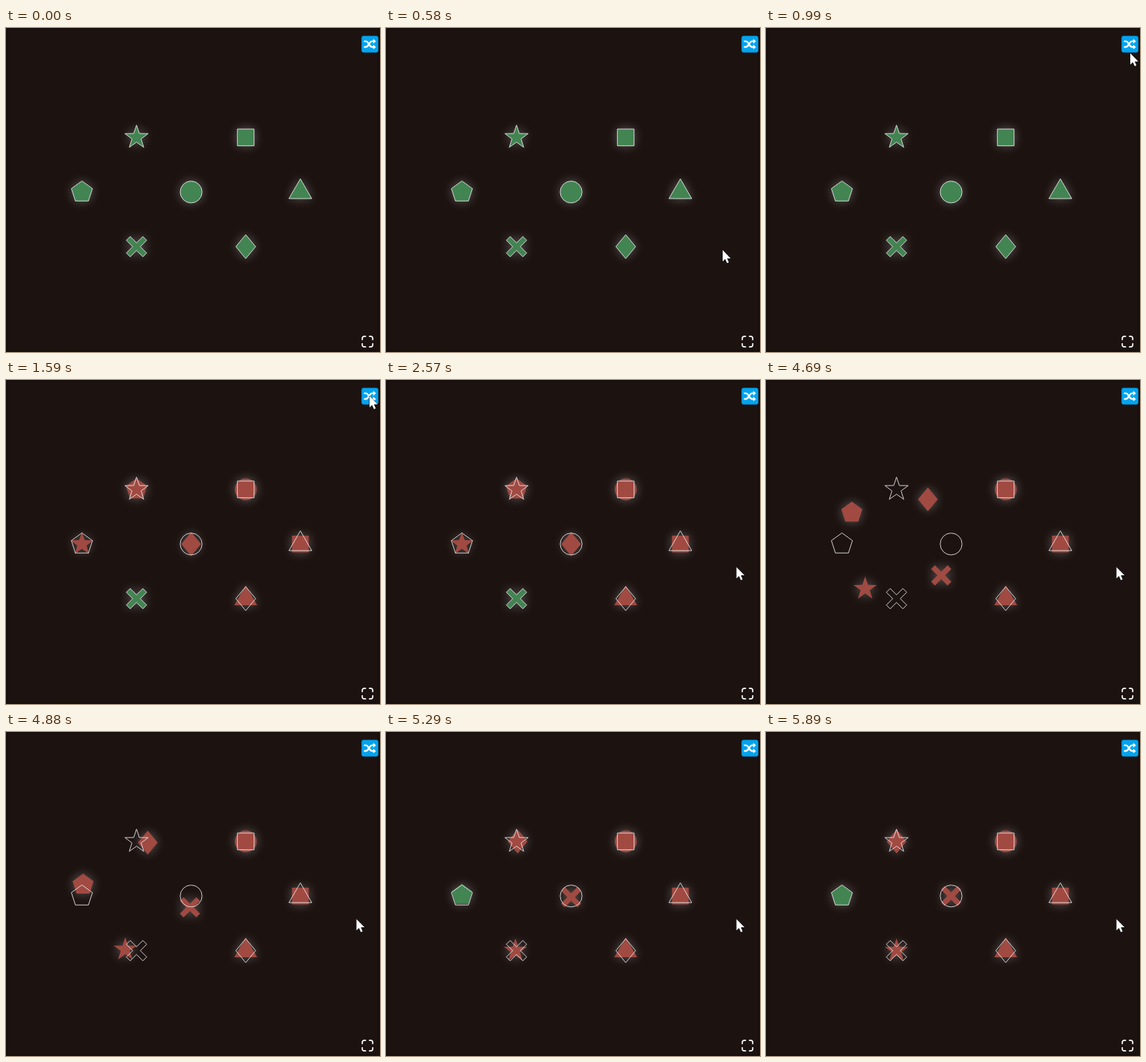
An HTML page with a canvas for the animation above (8 s loop, 500 by 433 pixels).

```html
<!DOCTYPE html>
<html lang="en">
<head>
<meta charset="utf-8">
<title>Shape rotation puzzle</title>
<style>
html, body { margin: 0; width: 100%; height: 100%; overflow: hidden; background: #1c1311; }
canvas { display: block; }
</style>
</head>
<body>
<canvas id="stage" width="500" height="433"></canvas>
<script>
const LOOP = 8000, SHUFFLE_AT = 1590, TURN_AT = 4540;
const CENTER = { x: 247.5, y: 219.2 }, STEP = 73, TAU = 2 * Math.PI;
const GREEN = '#428452', RED = '#a04a42';
const ctx = document.getElementById('stage').getContext('2d');

// Corners evenly around a circle; the listed radii alternate.
function radial(count, radii, turn = 0) {
  const path = new Path2D();
  for (let i = 0; i < count; i++) {
    const a = (i + turn) / count * TAU, r = radii[i % radii.length];
    path.lineTo(r * Math.sin(a), -r * Math.cos(a));
  }
  path.closePath();
  return path;
}

// Diagonal cross: one notch and two arm corners per quarter turn.
function diagonalCross(length, width) {
  const path = new Path2D();
  const far = (length + width) * Math.SQRT1_2, near = (length - width) * Math.SQRT1_2;
  for (let i = 0; i < 4; i++) {
    const c = Math.cos(i * TAU / 4), s = Math.sin(i * TAU / 4);
    for (const [x, y] of [[0, -width * Math.SQRT2], [near, -far], [far, -near]])
      path.lineTo(x * c - y * s, x * s + y * c);
  }
  path.closePath();
  return path;
}

const circle = new Path2D();
circle.arc(0, 0, 14.6, 0, TAU);

const shapes = {
  star: radial(10, [16.4, 6.4]),
  square: radial(4, [15.8], 0.5),
  pentagon: radial(5, [14.8]),
  circle,
  triangle: radial(3, [17.6]),
  cross: diagonalCross(15.6, 3.6),
  diamond: radial(4, [16, 13.2])
};

// Two rings share the middle place; each is listed counterclockwise from its right.
function placeRings(left, right) {
  const places = {};
  [left, right].forEach((names, side) => names.forEach((name, i) => {
    const a = -i * TAU / 4;
    places[name] = {
      x: CENTER.x + STEP * (2 * side - 1 + Math.cos(a)),
      y: CENTER.y + STEP * Math.sin(a)
    };
  }));
  return places;
}

const slots = placeRings(['circle', 'star', 'pentagon', 'cross'], ['triangle', 'square', 'circle', 'diamond']);
const shuffled = placeRings(['diamond', 'pentagon', 'star', 'cross'], ['square', 'circle', 'diamond', 'triangle']);

const cursorStops = [
  [370, 437, 390], [1000, 487, 33.5], [1180, 486, 21.5], [1960, 486, 21.5], [2130, 468.5, 250]
];
const clicks = [[1380, 1590], [2320, 2570]];

function drawAt({ x, y }, paint) {
  ctx.save();
  ctx.translate(x, y);
  paint();
  ctx.restore();
}

// The left ring makes a quarter turn that slows down exponentially.
function tokenPosition(name, t) {
  const place = (t < SHUFFLE_AT ? slots : shuffled)[name];
  const pivotX = CENTER.x - STEP;
  const dx = place.x - pivotX, dy = place.y - CENTER.y;
  if (t < TURN_AT || Math.hypot(dx, dy) > STEP + 1) return place;
  const a = -TAU / 4 * (1 - Math.exp(-(t - TURN_AT + 15) / 176));
  return {
    x: pivotX + dx * Math.cos(a) - dy * Math.sin(a),
    y: CENTER.y + dx * Math.sin(a) + dy * Math.cos(a)
  };
}

function cursorPosition(t) {
  const last = cursorStops.length - 1;
  const i = Math.min(cursorStops.findLastIndex(stop => stop[0] <= t), last - 1);
  const [t0, x0, y0] = cursorStops[i], [t1, x1, y1] = cursorStops[i + 1];
  const u = Math.min(1, (t - t0) / (t1 - t0)), p = u * u * (3 - 2 * u);
  return { x: x0 + (x1 - x0) * p, y: y0 + (y1 - y0) * p };
}

function drawBackground() {
  ctx.fillStyle = '#1c1311';
  ctx.fillRect(0, 0, 500, 433);
  for (let i = 0; i < 4; i++) {
    ctx.strokeStyle = `rgba(0,0,0,${0.2 - i * 0.05})`;
    ctx.strokeRect(i + 0.5, i + 0.5, 499 - 2 * i, 432 - 2 * i);
  }
}

function drawTokens(t) {
  for (const name in shapes) {
    const pos = tokenPosition(name, t), home = slots[name];
    drawAt(pos, () => {
      ctx.shadowColor = 'rgba(255,255,255,0.3)';
      ctx.shadowBlur = 14;
      ctx.fillStyle = Math.hypot(pos.x - home.x, pos.y - home.y) < 7 ? GREEN : RED;
      ctx.fill(shapes[name]);
    });
  }
  ctx.strokeStyle = 'rgba(235,235,235,0.85)';
  for (const name in slots) drawAt(slots[name], () => ctx.stroke(shapes[name]));
}

function drawShuffleButton() {
  ctx.fillStyle = '#04a3ee';
  ctx.beginPath();
  ctx.roundRect(-11.2, -11.2, 22.4, 22.4, 3);
  ctx.fill();
  ctx.fillStyle = ctx.strokeStyle = '#fff';
  ctx.lineWidth = 2.1;
  for (const flip of [1, -1]) {
    ctx.scale(1, flip);
    ctx.beginPath();
    ctx.moveTo(-8, -3.8);
    ctx.lineTo(-5.5, -3.8);
    ctx.bezierCurveTo(-1.5, -3.8, -1, 3.8, 3, 3.8);
    ctx.lineTo(5, 3.8);
    ctx.stroke();
    ctx.beginPath();
    ctx.moveTo(4.4, 0.6);
    ctx.lineTo(8.2, 3.8);
    ctx.lineTo(4.4, 7);
    ctx.fill();
  }
}

function drawExpandIcon() {
  ctx.strokeStyle = '#fff';
  ctx.lineWidth = 1.7;
  ctx.lineCap = 'round';
  for (let i = 0; i < 4; i++) {
    ctx.rotate(TAU / 4);
    ctx.beginPath();
    ctx.moveTo(-7, -2.7);
    ctx.arcTo(-7, -7, -2.7, -7, 2.5);
    ctx.lineTo(-2.7, -7);
    ctx.stroke();
  }
}

const arrow = new Path2D('M0 0V15.2L3.4 12 5.9 17.4 8.3 16.4 6 11.1H10.8Z');

function drawCursor(t) {
  if (t < cursorStops[0][0]) return;
  drawAt(cursorPosition(t), () => {
    if (clicks.some(([down, up]) => t >= down && t < up)) {
      ctx.fillStyle = 'rgba(255,255,0,0.47)';
      ctx.beginPath();
      ctx.arc(0, 0, 12, 0, TAU);
      ctx.fill();
    }
    ctx.strokeStyle = '#000';
    ctx.fillStyle = '#fff';
    ctx.stroke(arrow);
    ctx.fill(arrow);
  });
}

const start = performance.now();
function frame() {
  const t = (performance.now() - start) % LOOP;
  drawBackground();
  drawTokens(t);
  drawAt({ x: 486.5, y: 21.6 }, drawShuffleButton);
  drawAt({ x: 483.3, y: 419.2 }, drawExpandIcon);
  drawCursor(t);
  requestAnimationFrame(frame);
}
frame();
</script>
</body>
</html>
```
